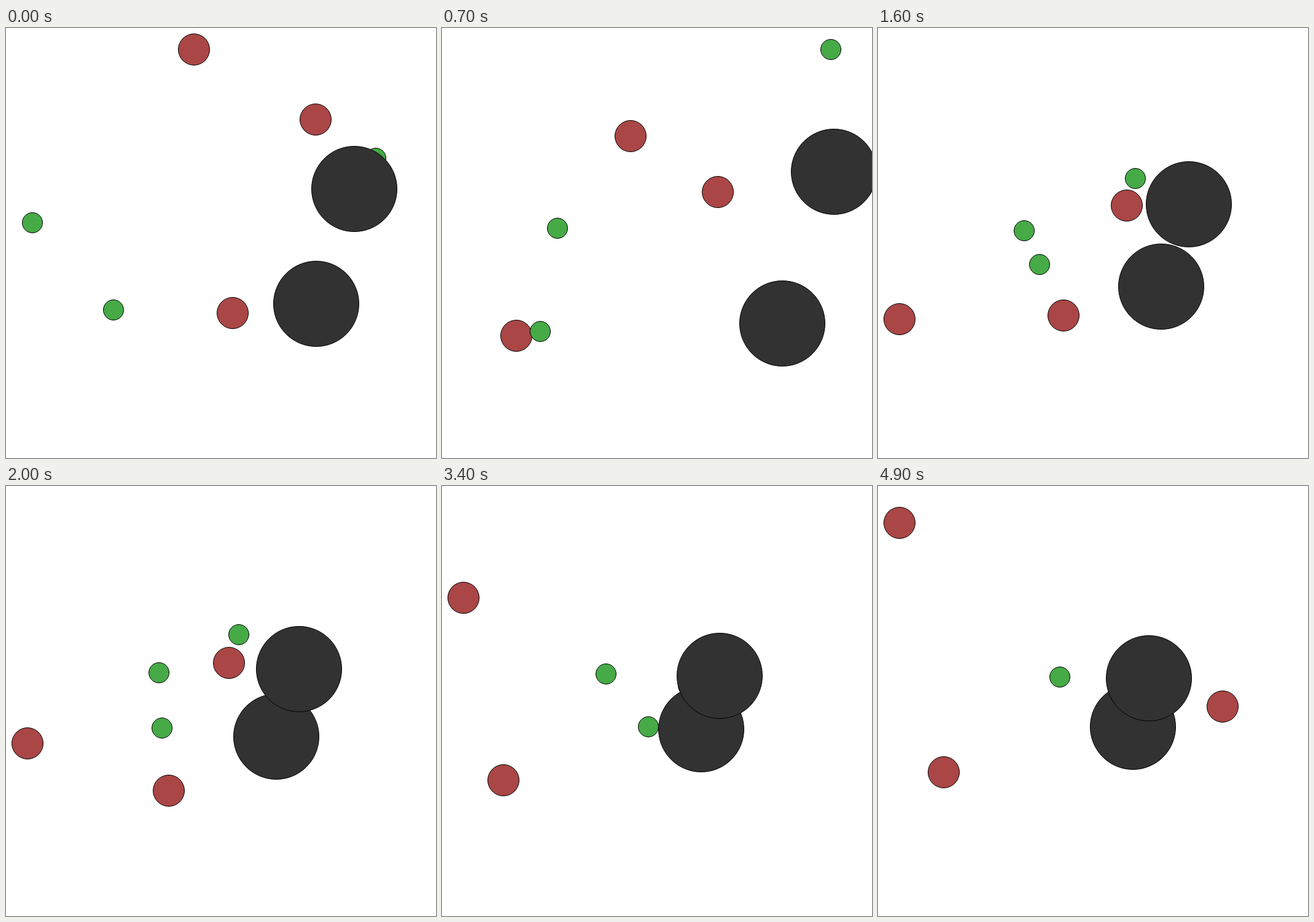
An HTML page with a canvas that plays this animation: 700 by 700 pixels, repeating every 5 s.

```html
<!DOCTYPE html>
<html lang="en">
<head>
<meta charset="utf-8">
<title>Chase</title>
<style>
  html, body { margin: 0; width: 100%; height: 100%; overflow: hidden; background: #fff; }
  canvas { display: block; width: 700px; height: 700px; }
</style>
</head>
<body>
<canvas id="stage" width="700" height="700"></canvas>
<script>
const ctx = document.getElementById('stage').getContext('2d');
const STEP = 100, STEPS = 50, MID = 350, REACH = 315;

const HUNTER = { r: 26, fill: '#aa4646' };
const RUNNER = { r: 17, fill: '#46aa46' };
const ROCK = { r: 70, fill: '#323232' };

// Steps at which every agent changes course
const TURNS = [0, 7, 12, 20, 28, 41, 49];

// World coordinates from the centre, one per turn; agents start and end at rest
const agents = [
  { kind: HUNTER,
    x: [-44, -32, 113, 23, 185, 290, 502],
    y: [-315, -131, -69, -105, -30, -55, 23] },
  { kind: HUNTER,
    x: [154, 75, -4, -144, -392, -618, -576],
    y: [-201, -62.5, 58, 250, 272, 275, 277] },
  { kind: HUNTER,
    x: [19, -173, -317.5, -537.6, -610.1, -730.9, -748.2],
    y: [114, 115, 177, 119, -144, -570, -688] },
  { kind: RUNNER,
    x: [-307, -122, -83, -163, -109, 60, 90],
    y: [-33, -18, 16, 76, 84, 95, 95] },
  { kind: RUNNER,
    x: [-175, -143.5, -142, -172, -189, -150, -127],
    y: [109, 109, 37, -78, -90, -92, -91] },
  { kind: RUNNER, launch: -70,
    x: [252, 214.5, 164, 50, 135, 66, 120],
    y: [-138, -238.36, -125.5, -183, -85, -41, -40] }
];
const rocks = [[155.1, 99.87], [217.96, -87.05]];

function slope(v, i, launch) {
  if (i === 0) return launch;
  if (i === v.length - 1) return 0;
  const before = TURNS[i] - TURNS[i - 1], after = TURNS[i + 1] - TURNS[i];
  return ((v[i] - v[i - 1]) * after / before + (v[i + 1] - v[i]) * before / after) / (before + after);
}

// Cubic Hermite through the turning points
function glide(v, n, launch = 0) {
  const i = Math.max(0, TURNS.findIndex(t => t >= n) - 1);
  const h = TURNS[i + 1] - TURNS[i], s = (n - TURNS[i]) / h, u = 1 - s;
  return u * u * ((1 + 2 * s) * v[i] + s * h * slope(v, i, launch)) +
    s * s * ((1 + 2 * u) * v[i + 1] - u * h * slope(v, i + 1, launch));
}

const pixel = (v, zoom) => MID + Math.floor(v * zoom + 1e-6);

function disc(kind, [x, y], zoom) {
  ctx.beginPath();
  ctx.arc(pixel(x, zoom), pixel(y, zoom), kind.r - 0.5, 0, Math.PI * 2);
  ctx.fillStyle = kind.fill;
  ctx.fill();
  ctx.stroke();
}

function draw(n) {
  ctx.fillStyle = '#fff';
  ctx.fillRect(0, 0, 700, 700);
  ctx.strokeStyle = '#000';
  ctx.lineWidth = 1;
  const spots = agents.map(a => [glide(a.x, n), glide(a.y, n, a.launch)]);
  // The camera always fits the farthest agent; disc sizes stay fixed
  const zoom = REACH / Math.max(...spots.flat().map(Math.abs));
  agents.forEach((a, i) => disc(a.kind, spots[i], zoom));
  rocks.forEach(p => disc(ROCK, p, zoom));
}

const start = performance.now();
function tick() {
  const t = Math.max(0, performance.now() - start);
  draw(Math.floor(t / STEP) % STEPS);
  requestAnimationFrame(tick);
}
tick();
</script>
</body>
</html>
```
